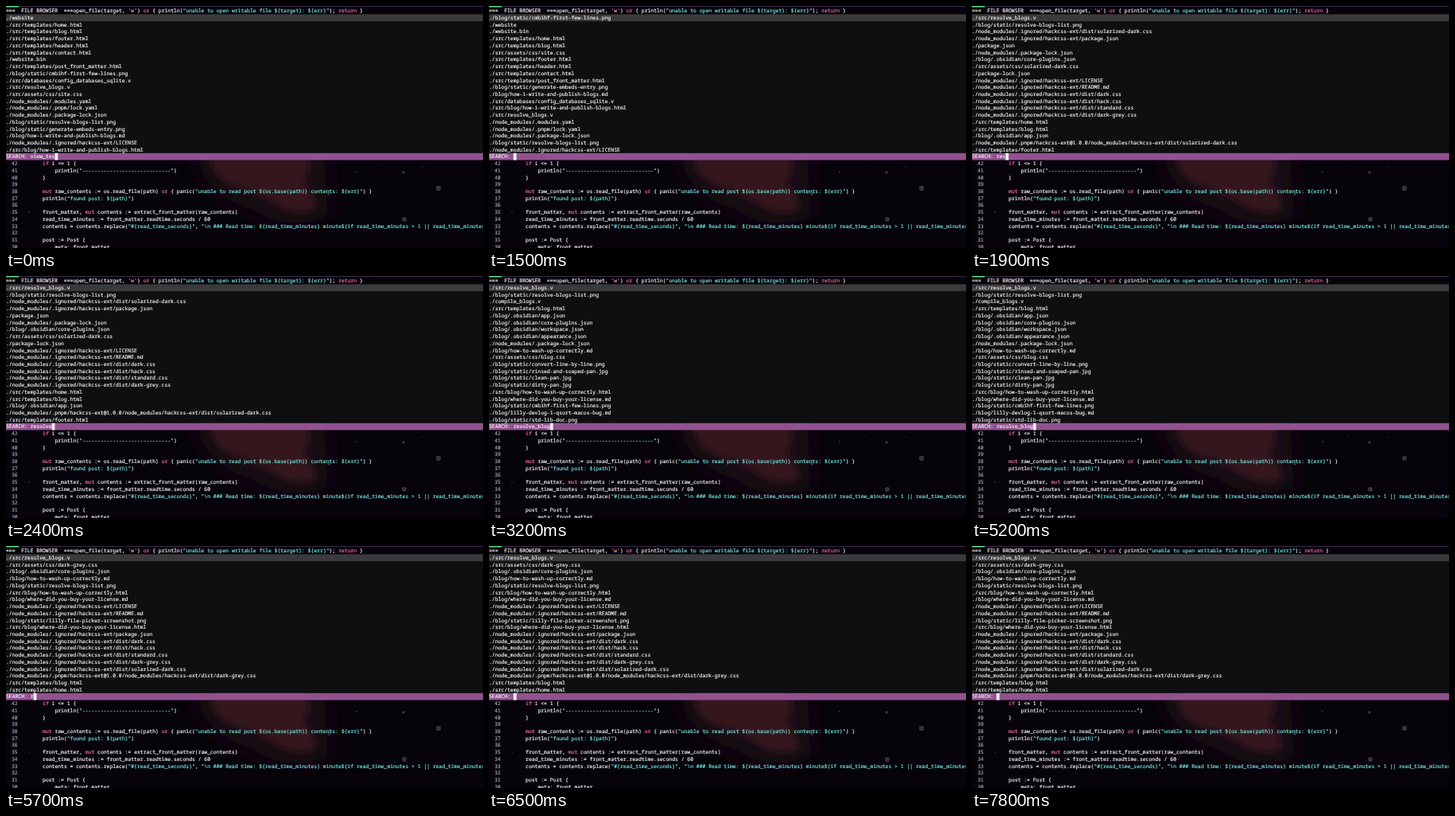
An HTML page that plays this animation: 600x304 px, repeating every 8 s.

```html
<!DOCTYPE html>
<html lang="en">
<head>
<meta charset="utf-8">
<title>File browser search</title>
<style>
  html, body { margin: 0; width: 100%; height: 100%; overflow: hidden; background: #06030a; }
  svg { display: block; width: 100vw; height: 100vh; }
  text {
    font: 500 6.4px "Noto Sans Mono", "DejaVu Sans Mono", monospace;
    white-space: pre; color: #efedf0; text-rendering: geometricPrecision;
  }
  text, tspan { fill: currentColor; stroke: currentColor; stroke-width: .2px; }
  .str { color: #6fe3dc; }
  .key { color: #ea6aa6; }
  .chr { color: #e58a9c; }
  .line { color: #a49fa8; }
</style>
</head>
<body>
<svg id="stage" viewBox="0 0 600 304">
  <defs>
    <filter id="soft" x="-30%" y="-30%" width="160%" height="160%"><feGaussianBlur stdDeviation="5"/></filter>
    <filter id="mist" x="-50%" y="-50%" width="200%" height="200%"><feGaussianBlur stdDeviation="16"/></filter>
  </defs>
  <rect width="600" height="304" fill="#06030a"/>
  <rect width="600" height="1" fill="#3b2b4a"/>
  <path d="M235 180H400L405 265Q350 285 310 255Q250 240 235 180Z" fill="#1d0b12" filter="url(#mist)"/>
  <path d="M258 180Q254 212 284 224Q312 232 332 244Q360 266 388 256Q392 238 372 222Q386 206 378 180Z" fill="#35151c" filter="url(#soft)"/>
  <g id="stars"></g>
  <g id="code"></g>
  <g id="panel"></g>
</svg>
<script>
const COL = 3.84, ROW = 8.72, TOP = 1.7, LOOP = 8000;
const NS = "http://www.w3.org/2000/svg";
const $ = id => document.getElementById(id);
const rowTop = row => TOP + row * ROW;

function add(parent, tag, attrs, content = "") {
  const el = document.createElementNS(NS, tag);
  for (const k in attrs) el.setAttribute(k, attrs[k]);
  el.textContent = content;
  return parent.appendChild(el);
}
const rect = (parent, x, y, width, height, fill) =>
  add(parent, "rect", { x, y, width, height, fill });
const label = (parent, col, row, content, cls = "") =>
  add(parent, "text", { x: col * COL, y: rowTop(row) + 6.6, class: cls }, content);

// Code with simple syntax colouring
const TOKEN = /("[^"]*"?)|('[^']*')|\b(or|mut|if|return)\b/g;
const CLASSES = ["str", "chr", "key"];
function codeLine(parent, col, row, source) {
  const line = label(parent, col, row, "");
  let last = 0;
  for (const m of source.matchAll(TOKEN)) {
    add(line, "tspan", {}, source.slice(last, m.index));
    add(line, "tspan", { class: CLASSES[m.slice(1).findIndex(Boolean)] }, m[0]);
    last = m.index + m[0].length;
  }
  add(line, "tspan", {}, source.slice(last));
}

const CODE = String.raw`if i <= 1 {
    println("${"-".repeat(29)}")
}

mut raw_contents := os.read_file(path) or { panic("unable to read post @{os.base(path)} contents: @{err}") }
println("found post: @{path}")

front_matter, mut contents := extract_front_matter(raw_contents)
read_time_minutes := front_matter.readtime.seconds / 60
contents = contents.replace("#{read_time_seconds}", "\n ### Read time: @{read_time_minutes} minute@{if read_time_minutes > 1 || read_time_minutes

post := Post {
    meta: front_matter,`.replaceAll("@", "$").split("\n");

const files = block => block.trim().split("\n");
const HACK = "./node_modules/.ignored/hackcss-ext/";
const LISTS = {
  view: files(`
./website
./src/templates/home.html
./src/templates/blog.html
./src/templates/footer.html
./src/templates/header.html
./src/templates/contact.html
./website.bin
./src/templates/post_front_matter.html
./blog/static/cmbihf-first-few-lines.png
./src/databases/config_databases_sqlite.v
./src/resolve_blogs.v
./src/assets/css/site.css
./node_modules/.modules.yaml
./node_modules/.pnpm/lock.yaml
./node_modules/.package-lock.json
./blog/static/resolve-blogs-list.png
./blog/static/generate-embeds-entry.png
./blog/how-i-write-and-publish-blogs.md
${HACK}LICENSE
./src/blog/how-i-write-and-publish-blogs.html`),
  v: files(`
./blog/static/cmbihf-first-few-lines.png
./website
./website.bin
./src/templates/home.html
./src/templates/blog.html
./src/assets/css/site.css
./src/templates/footer.html
./src/templates/header.html
./src/templates/contact.html
./src/templates/post_front_matter.html
./blog/static/generate-embeds-entry.png
./blog/how-i-write-and-publish-blogs.md
./src/databases/config_databases_sqlite.v
./src/blog/how-i-write-and-publish-blogs.html
./src/resolve_blogs.v
./node_modules/.modules.yaml
./node_modules/.pnpm/lock.yaml
./node_modules/.package-lock.json
./blog/static/resolve-blogs-list.png
${HACK}LICENSE`),
  r: files(`
./src/resolve_blogs.v
./src/assets/css/dark-grey.css
./blog/.obsidian/core-plugins.json
./blog/how-to-wash-up-correctly.md
./blog/static/resolve-blogs-list.png
./src/blog/how-to-wash-up-correctly.html
./blog/where-did-you-buy-your-license.md
${HACK}LICENSE
${HACK}README.md
./blog/static/lilly-file-picker-screenshot.png
./src/blog/where-did-you-buy-your-license.html
${HACK}package.json
${HACK}dist/dark.css
${HACK}dist/hack.css
${HACK}dist/standard.css
${HACK}dist/dark-grey.css
${HACK}dist/solarized-dark.css
./node_modules/.pnpm/hackcss-ext@1.0.0/node_modules/hackcss-ext/dist/dark-grey.css
./src/templates/blog.html
./src/templates/home.html`),
  resolve: files(`
./src/resolve_blogs.v
./blog/static/resolve-blogs-list.png
${HACK}dist/solarized-dark.css
${HACK}package.json
./package.json
./node_modules/.package-lock.json
./blog/.obsidian/core-plugins.json
./src/assets/css/solarized-dark.css
./package-lock.json
${HACK}LICENSE
${HACK}README.md
${HACK}dist/dark.css
${HACK}dist/hack.css
${HACK}dist/standard.css
${HACK}dist/dark-grey.css
./src/templates/home.html
./src/templates/blog.html
./blog/.obsidian/app.json
./node_modules/.pnpm/hackcss-ext@1.0.0/node_modules/hackcss-ext/dist/solarized-dark.css
./src/templates/footer.html`),
  blog: files(`
./src/resolve_blogs.v
./blog/static/resolve-blogs-list.png
./compile_blogs.v
./src/templates/blog.html
./blog/.obsidian/app.json
./blog/.obsidian/core-plugins.json
./blog/.obsidian/workspace.json
./blog/.obsidian/appearance.json
./node_modules/.package-lock.json
./blog/how-to-wash-up-correctly.md
./src/assets/css/blog.css
./blog/static/convert-line-by-line.png
./blog/static/rinsed-and-soaped-pan.jpg
./blog/static/clean-pan.jpg
./blog/static/dirty-pan.jpg
./src/blog/how-to-wash-up-correctly.html
./blog/where-did-you-buy-your-license.md
./blog/static/cmbihf-first-few-lines.png
./blog/lilly-devlog-1-qsort-macos-bug.md
./blog/static/std-lib-doc.png`)
};

// Fixed scenery: x, y, radius
const STARS = [[544, 229, 3.2], [501, 268, 3], [500, 209, 1.8], [406, 236, 2], [441, 208, 1], [472, 201, .7], [524, 202, .7], [29, 259, .9]];
for (const [cx, cy, r] of STARS)
  add($("stars"), "circle", { cx, cy, r, fill: "#37313b" });

codeLine($("code"), 22, 0, `open_file(target, 'w') or { println("unable to open writable file \${target}: \${err}"); return }`);
CODE.forEach((source, i) => {
  label($("code"), 1.8, 22 + i, 42 - i, "line");
  codeLine($("code"), 12, 22 + i, source);
});

const panel = $("panel");
rect(panel, 0, 0, 16, 1.5, "#5fe08a");
label(panel, 0, 0, "===  FILE BROWSER  ===");
rect(panel, 0, rowTop(1), 600, ROW * 20, "#0f0e11");
rect(panel, 0, rowTop(1), 600, ROW, "#3a393b");
rect(panel, 0, rowTop(21), 600, ROW, "#91528f");
const rows = LISTS.view.map((_, i) => label(panel, 0, i + 1, ""));
const search = label(panel, 0, 21, "");
const cursor = rect(panel, 0, rowTop(21), COL, ROW, "#f4f0f4");

const typed = (word, t) => word.slice(0, Math.max(0, Math.floor(t / 120.5)));
const erased = (word, t) => word.slice(0, Math.max(0, word.length - Math.floor(Math.max(0, t) / 45)));

function queryAt(t) {
  if (t < 1500) return erased("view_tes", t - 500);
  if (t < 5200) return typed("resolve_blog", t - 1450);
  return erased("resolve_blog", t - 5200);
}

// An empty query keeps the previous results
function listAt(t, length) {
  if (t < 1500) return length > 3 ? LISTS.view : LISTS.v;
  if (!length && t < 5200) return LISTS.v;
  return length > 8 ? LISTS.blog : length > 2 ? LISTS.resolve : LISTS.r;
}

function render(time) {
  const t = Math.floor(time % LOOP / 100) * 100;
  const query = queryAt(t), list = listAt(t, query.length);
  rows.forEach((row, i) => row.textContent = list[i]);
  search.textContent = "SEARCH: " + query;
  cursor.setAttribute("x", (8 + query.length) * COL);
}

const start = performance.now();
function tick() {
  render(performance.now() - start);
  requestAnimationFrame(tick);
}
tick();
</script>
</body>
</html>
```
